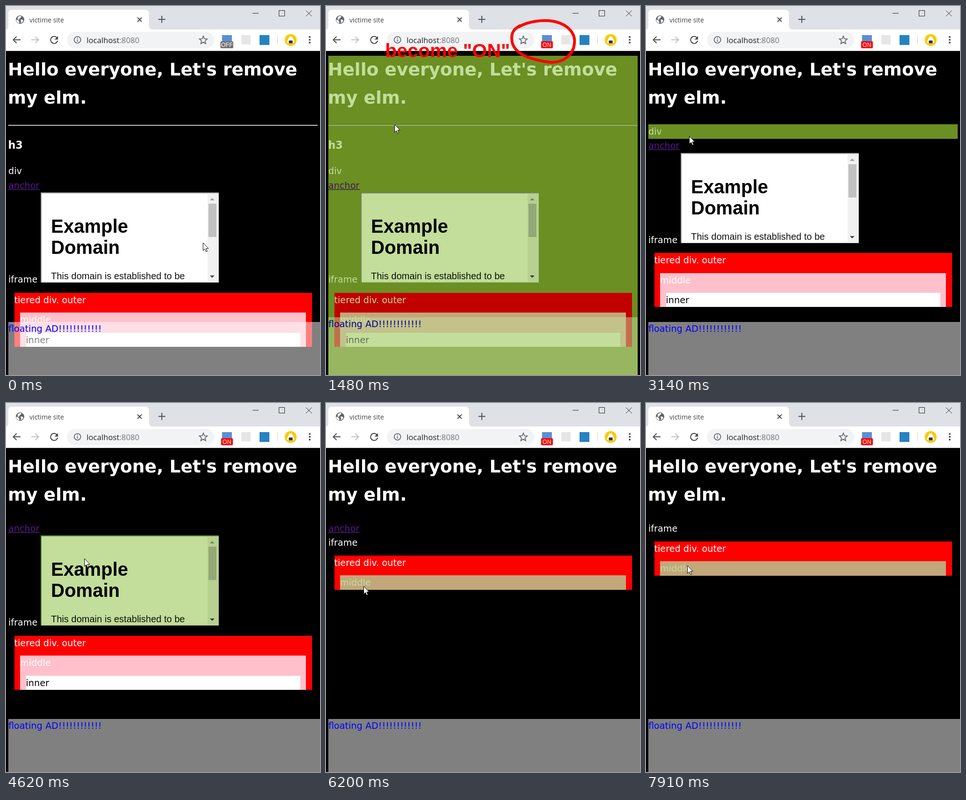
Recreate the animation shown at these times as an HTML page with a canvas. Size 670x786 px, loop 8000 ms.

```html
<!DOCTYPE html>
<html lang="en">
<head>
<meta charset="utf-8">
<title>Element remover demo</title>
<style>
html, body { margin: 0; width: 670px; height: 786px; overflow: hidden; background: #000; }
canvas { display: block; }
</style>
</head>
<body>
<canvas id="stage" width="670" height="786"></canvas>
<script>
const c = document.getElementById('stage').getContext('2d');
const LOOP = 8000;
const TINT = 'rgb(194,222,154)';   // multiplied over the hovered element
const BASE = 'rgb(141,164,58)';    // its background before the tint
const PAGE = '"DejaVu Sans", sans-serif';
const UI = '"Open Sans", sans-serif';
const ARIAL = '"Liberation Sans", sans-serif';
const RED = '#f00';

const hovers = [
  [0, ''], [510, 'body'], [1530, 'hr'], [2040, 'h3'], [2960, 'div'], [3600, 'anchor'],
  [4160, 'iframe'], [4850, 'outer'], [5000, 'line'], [5250, 'outer'], [5400, 'middle'],
  [5560, 'inner'], [5920, 'body'], [6120, 'middle'], [6300, 'outer'], [6390, 'line'],
  [6600, 'anchor'], [7170, 'line'], [7510, 'outer'], [7780, 'middle']
];
const removedAt = { hr: 2040, h3: 2960, div: 3600, iframe: 4850, inner: 5920, anchor: 7170 };
const pointer = [
  [0, 420, 504], [740, 420, 504], [840, 421, 503], [1150, 421, 503], [1480, 146, 252],
  [1760, 143, 254], [2040, 143, 254], [2400, 150, 258], [2780, 140, 264], [2960, 140, 264],
  [3140, 92, 277], [3550, 50, 266], [4110, 50, 266], [4620, 167, 331], [4850, 167, 331],
  [5100, 130, 302], [5540, 80, 409], [5640, 80, 422], [5700, 80, 422], [5740, 80, 424],
  [5920, 80, 424], [6200, 80, 390], [6710, 54, 271], [6790, 55, 273], [7450, 55, 273],
  [7910, 88, 346], [8000, 88, 346]
];

let now = 0, hover = '';
const has = name => now < removedAt[name];

function rect(x, y, w, h, color) {
  c.fillStyle = color;
  c.fillRect(x, y, w, h);
}
function round(x, y, w, h, r, color) {
  c.fillStyle = color;
  c.beginPath();
  c.roundRect(x, y, w, h, r);
  c.fill();
}
function disc(x, y, r, color) {
  c.fillStyle = color;
  c.beginPath();
  c.arc(x, y, r, 0, 7);
  c.fill();
}
function text(s, x, y, font, color) {
  c.font = font;
  c.fillStyle = color;
  c.fillText(s, x, y);
}
const label = (s, x, top, color = '#fff') => text(s, x, top + 21.5, '19.2px ' + PAGE, color);

function line(d, color, width) {
  c.strokeStyle = color;
  c.lineWidth = width;
  c.stroke(new Path2D(d));
}
function shape(d, color) {
  c.fillStyle = color;
  c.fill(new Path2D(d));
}

// Draws an element and tints it while it is hovered.
function element(name, x, y, w, h, draw) {
  const hot = hover === name;
  if (hot) rect(x, y, w, h, BASE);
  draw(hot);
  if (!hot) return;
  c.globalCompositeOperation = 'multiply';
  rect(x, y, w, h, TINT);
  c.globalCompositeOperation = 'source-over';
}

function iframe(y) {
  element('iframe', 74, y, 380, 192, hot => {
    rect(74, y, 380, 192, hot ? BASE : '#999');
    rect(76, y + 2, 378, 190, '#eee');
    c.save();
    c.beginPath();
    c.rect(76, y + 3, 376, 187);
    c.clip();
    rect(76, y, 376, 192, '#fff');
    text('Example', 96, y + 86, 'bold 40px ' + ARIAL, '#000');
    text('Domain', 96, y + 131, 'bold 40px ' + ARIAL, '#000');
    text('This domain is established to be', 96, y + 185, '20px ' + ARIAL, '#111');
    rect(430, y, 22, 192, '#f1f1f1');
    rect(432, y + 24, 17, 71, '#c1c1c1');
    shape(`M435 ${y + 17}h10l-5 -5z`, '#999');
    shape(`M435 ${y + 177}h10l-5 5z`, '#444');
    c.restore();
  });
}

function tiers(top) {
  const full = has('inner');
  const y = Math.round(top), mid = Math.round(top + 42.3), low = Math.round(top + 84.7);
  const end = y + (full ? 115 : 73);
  element('outer', 18, y, 635, end - y, () => {
    rect(18, y, 635, end - y, RED);
    label('tiered div. outer', 17.5, y);
    element('middle', 30, mid, 610, end - mid, () => {
      rect(30, mid, 610, end - mid, '#ffc0cb');
      label('middle', 30, mid);
      if (full) element('inner', 43, low, 585, end - low, () => {
        rect(43, low, 585, end - low, '#fff');
        label('inner', 42.5, low, '#000');
      });
    });
  });
}

function page() {
  rect(0, 96, 670, 690, '#000');
  element('body', 5, 106, 660, 680, hot => {
    const row = 30.3;
    text("Hello everyone, Let's remove", 4, 147.5, 'bold 37.5px ' + PAGE, '#fff');
    text('my elm.', 4, 207.5, 'bold 37.5px ' + PAGE, '#fff');
    let y = 252;
    if (has('hr')) {
      element('hr', 5, 252, 660, 4, () => {
        rect(5, 253, 660, 1, '#9a9a9a');
        rect(5, 254, 660, 1, '#eee');
      });
      y = 279;
    }
    if (has('h3')) {
      const top = y;
      element('h3', 5, top, 660, 34, () =>
        text('h3', 4.5, top + 25, 'bold 22.3px ' + PAGE, '#fff'));
      y += 57.4;
    }
    if (has('div')) {
      const top = Math.round(y);
      element('div', 5, top, 660, 31, () => label('div', 5, top));
      y += row;
    }
    if (has('anchor')) {
      const top = Math.round(y);
      element('anchor', 5, top, 67, 30, () => {
        label('anchor', 5, top, '#551a8b');
        rect(5, top + 23, 67, 1.5, '#551a8b');
      });
      y += row;
    }
    const top = Math.round(y), framed = has('iframe');
    element('line', 5, top, 660, framed ? 201 : 30, () => {
      label('iframe', 5, top + (framed ? 170 : 0));
      if (framed) iframe(top);
    });
    tiers(y + (framed ? 213.8 : 42.8));

    // A filtered body becomes the frame of the fixed banner.
    const [adTop, adWidth] = hot ? [663, 660] : [673, 665];
    rect(5, adTop, adWidth, 786 - adTop, 'rgba(255,255,255,.5)');
    label('floating AD!!!!!!!!!!!!', 5, adTop - .5, '#00f');
  });
}

function browser() {
  const ink = '#4a4d51';
  rect(0, 0, 670, 50, '#dee1e6');
  rect(0, 50, 670, 45, '#fff');
  rect(0, 95, 670, 1, '#b6b6b6');
  shape('M0 50Q5 50 5 44V16Q5 8 13 8H297Q305 8 305 16V42Q305 50 313 50Z', '#fff');
  disc(30, 29, 9, '#5f6368');
  shape('M25 24q4 -4 8 -2q-1 3 -4 4q0 4 -4 3zM31 29q4 -1 6 2q-2 5 -6 5q2 -3 0 -7zM22 29q5 1 6 4q1 2 0 4q-6 -2 -6 -8z', '#fff');
  text('victime site', 50, 34.5, '14.1px ' + UI, '#3c4043');
  line('M280.5 24.5l9 9m0 -9l-9 9', ink, 1.8);
  line('M325 28.5h15M332.5 21v15', ink, 2);
  line('M526 15.5h13M582.5 9.5h12v12h-12zM640 9.5l12.5 12.5m0 -12.5l-12.5 12.5', '#222', 1);

  line('M31 72H15.5M22.5 65l-7 7l7 7', ink, 2);
  line('M54 72h15.5M62.5 65l7 7l-7 7', '#bdc1c6', 2);
  line('M108.5 67.5A7.5 7.5 0 1 0 110 74', ink, 2);
  shape('M111 64v7.5h-7.5z', ink);
  round(130, 55, 314, 35, 17.5, '#f1f3f4');
  line('M159.5 72a7 7 0 1 0 -14 0a7 7 0 1 0 14 0M152.5 71v5M152.5 67.5v2', '#5f6368', 1.7);
  text('localhost', 172, 78.5, '16.7px ' + UI, '#202124');
  const port = 172 + c.measureText('localhost').width;
  text(':8080', port, 78.5, '16.7px ' + UI, '#70757a');

  c.beginPath();
  for (let i = 0; i < 10; i++) {
    const a = i * Math.PI / 5 - Math.PI / 2, r = i % 2 ? 4 : 8.8;
    c.lineTo(421 + r * Math.cos(a), 73 + r * Math.sin(a));
  }
  c.closePath();
  c.strokeStyle = '#5f6368';
  c.lineWidth = 1.7;
  c.stroke();

  rect(461, 62, 21, 20, '#5b8fd6');
  const on = now >= 510;
  round(on ? 459 : 457.5, 75, on ? 25 : 27.5, 15, 2, on ? RED : '#757575');
  c.textAlign = 'center';
  text(on ? 'ON' : 'OFF', 471.3, 87, '12.6px ' + ARIAL, '#fff');
  c.textAlign = 'left';
  rect(502, 62, 20, 20, '#e6e6e6');
  rect(541, 62, 21, 21, '#2583c4');
  rect(579, 62, 1, 20, '#d0d7e5');
  disc(607.5, 72.5, 12.8, '#fbcb0a');
  shape('M607.5 64.5Q609.5 64.5 611 67L615 75Q616.5 79.5 612 79.5H603Q598.5 79.5 600 75L604 67Q605.5 64.5 607.5 64.5Z', '#fff');
  rect(603.5, 73.5, 8, 6, '#333');
  for (const y of [66, 72, 78]) disc(648, y, 2, ink);
}

function note() {
  text('become "ON"', 126, 109, 'bold 41px ' + ARIAL, RED);
  c.lineCap = 'round';
  line('M412 44C432 33 462 28 488 33C518 40 533 60 530 80C528 104 506 121 480 120C442 116 402 104 397 76C394 58 400 49 414 42', RED, 6);
  c.lineCap = 'butt';
}

// Link address bubble in the lower left corner.
function status(from, to) {
  if (now < from || now > to) return;
  c.globalAlpha = Math.min(1, (now - from + 35) / 105);
  round(0, 770, 80, 20, [0, 4, 0, 0], '#dee1e6');
  text('localhost/#', 4, 783, '12px ' + UI, '#5f6368');
  c.globalAlpha = 1;
}

function cursor() {
  const i = pointer.findIndex(k => k[0] > now);
  const [t0, x0, y0] = pointer[i - 1], [t1, x1, y1] = pointer[i];
  const p = (now - t0) / (t1 - t0), e = p * p * (3 - 2 * p);
  c.save();
  c.translate(Math.round(x0 + (x1 - x0) * e) + .5, Math.round(y0 + (y1 - y0) * e) + .5);
  const arrow = 'M0 0V16.5L3.8 13L6.5 19L9 18L6.4 12H11.5Z';
  shape(arrow, '#fff');
  line(arrow, '#000', 1);
  c.restore();
}

function draw() {
  now = performance.now() % LOOP;
  hover = hovers.findLast(h => h[0] <= now)[1];
  page();
  browser();
  if (now >= 510 && now < 2960) note();
  status(3760, 4160);
  status(6940, 7510);
  cursor();
  requestAnimationFrame(draw);
}
draw();
</script>
</body>
</html>
```
